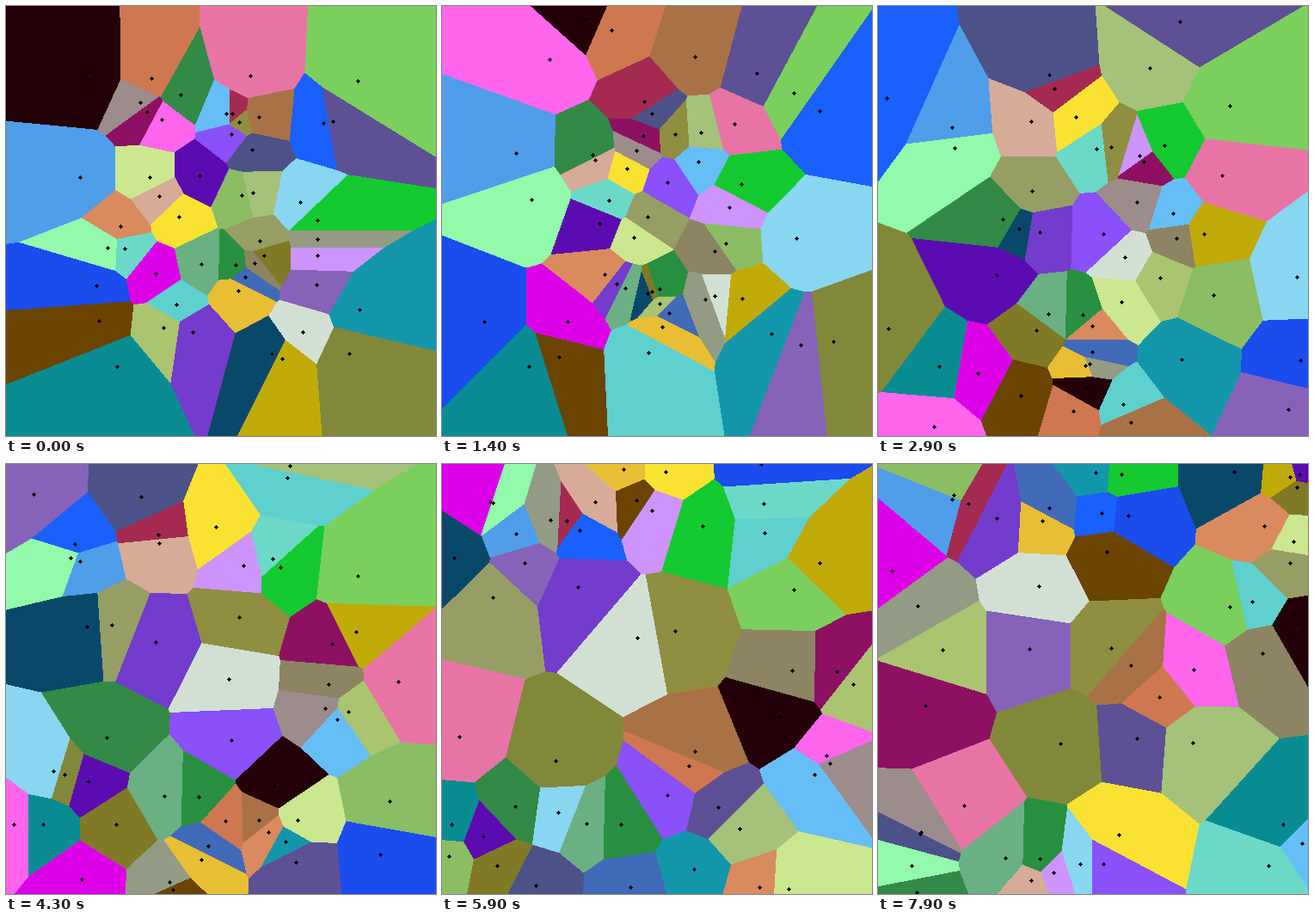
Write an HTML page with a canvas that moves like this. It is 500x500 px and loops after 8 s.

```html
<!DOCTYPE html>
<html lang="en">
<head>
<meta charset="utf-8">
<title>Drifting Voronoi cells</title>
<style>
  html, body { margin: 0; width: 100%; height: 100%; overflow: hidden; }
  canvas { display: block; width: 100vw; height: 100vh; image-rendering: pixelated; }
</style>
</head>
<body>
<canvas id="stage" width="500" height="500"></canvas>
<script>
const SIZE = 500, STEP = 100, LOOP = 8000;
const ctx = document.getElementById('stage').getContext('2d');
const cells = [];

// Start position, then velocity in pixels per step.
function cell(color, x, y, vx, vy) {
  cells.push({ color, x, y, vx, vy });
}

cell('#240008', 97, 85, 5, -5);
cell('#cf7751', 169, 84, 2, -4);
cell('#e874a6', 284, 81, 4, 4);
cell('#7bcf5c', 409, 87, 0, 1);
cell('#9c8c8c', 156, 112, 5, 4);
cell('#328a46', 203, 103, -2, 5);
cell('#ff66ec', 181, 132, -4, -5);
cell('#8e1062', 164, 123, 5, 2);
cell('#66bef6', 256, 125, 3, 4);
cell('#a42a52', 263, 125, -2, -1);
cell('#908e40', 271, 135, 0, 1);
cell('#a87246', 294, 129, 0, -5);
cell('#1a60ff', 369, 136, 5, -1);
cell('#5e5094', 380, 134, -1, -4);
cell('#8a50fa', 262, 149, 0, 4);
cell('#4c5287', 286, 167, -3, -3);
cell('#509dea', 86, 199, 0, -2);
cell('#cbe78f', 167, 199, 4, 5);
cell('#5a0cb0', 225, 197, -3, 4);
cell('#d6ab98', 178, 221, 0, -3);
cell('#fae233', 201, 245, 1, -4);
cell('#8abd64', 274, 220, 4, 4);
cell('#a4c27a', 287, 217, 1, -5);
cell('#88d6f0', 342, 228, 5, 3);
cell('#14ca30', 362, 249, -1, -3);
cell('#d98a5e', 133, 256, 4, 4);
cell('#92faaa', 118, 281, -1, -4);
cell('#6bd8c8', 138, 282, 4, -4);
cell('#1a4cee', 105, 325, -4, 3);
cell('#dc00e6', 174, 311, -2, 4);
cell('#6ab082', 227, 300, -1, 2);
cell('#289040', 267, 301, -1, 2);
cell('#969e66', 295, 273, -4, -2);
cell('#949b84', 362, 271, -4, 5);
cell('#ce94fe', 362, 290, -2, -4);
cell('#8662b8', 361, 324, 4, 5);
cell('#8c8462', 289, 299, 2, -1);
cell('#807a26', 300, 290, -4, 3);
cell('#416ab8', 278, 315, -1, 3);
cell('#e8be34', 270, 331, -1, 3);
cell('#5ed0ce', 198, 347, 3, 4);
cell('#aac470', 183, 374, 5, -2);
cell('#743ccc', 217, 379, -1, -4);
cell('#6a4400', 108, 366, 2, 3);
cell('#088c92', 129, 419, -2, 0);
cell('#1496aa', 411, 353, -2, 2);
cell('#d2e0d4', 345, 379, -2, -3);
cell('#0a486a', 309, 404, -5, -5);
cell('#c0aa08', 321, 410, 2, -5);
cell('#82883a', 399, 404, 4, -1);

// Leaving one edge restarts exactly on the opposite edge.
function drift(p, v, steps) {
  for (let i = 0; i < steps; i++) {
    p += v;
    if (p < 0) p = SIZE - 1;
    else if (p >= SIZE) p = 0;
  }
  return p;
}

// Squared distance minus the terms shared by every seed is linear in x,
// so each row is the lower envelope of a set of lines.
function paintRow(seeds, y) {
  for (const s of seeds) s.c = s.x * s.x + s.y * s.y - 2 * y * s.y;
  let cur = seeds.reduce((a, b) => (b.c < a.c ? b : a));
  let x = 0;
  while (cur) {
    let next = null, cross = SIZE;
    for (const s of seeds) {
      if (s.x <= cur.x) continue;
      const at = (s.c - cur.c) / (2 * (s.x - cur.x));
      if (at < cross) { cross = at; next = s; }
    }
    const end = Math.ceil(cross);
    if (end > x) {
      ctx.fillStyle = cur.color;
      ctx.fillRect(x, y, end - x, 1);
      x = end;
    }
    cur = next;
  }
}

function paintDot({ x, y }) {
  for (let r = -2; r <= 2; r++) {
    const half = 2 - Math.abs(r);
    ctx.fillRect(x - half, y + r, 2 * half + 1, 1);
  }
}

function paint(step) {
  const seeds = cells.map(({ color, x, y, vx, vy }) => ({
    color, x: drift(x, vx, step), y: drift(y, vy, step)
  }));
  for (let y = 0; y < SIZE; y++) paintRow(seeds, y);
  ctx.fillStyle = '#000';
  seeds.forEach(paintDot);
}

const start = performance.now();
let shown = -1;

function tick() {
  const step = Math.floor((performance.now() - start) % LOOP / STEP);
  if (step !== shown) paint(shown = step);
  requestAnimationFrame(tick);
}
tick();
</script>
</body>
</html>
```
